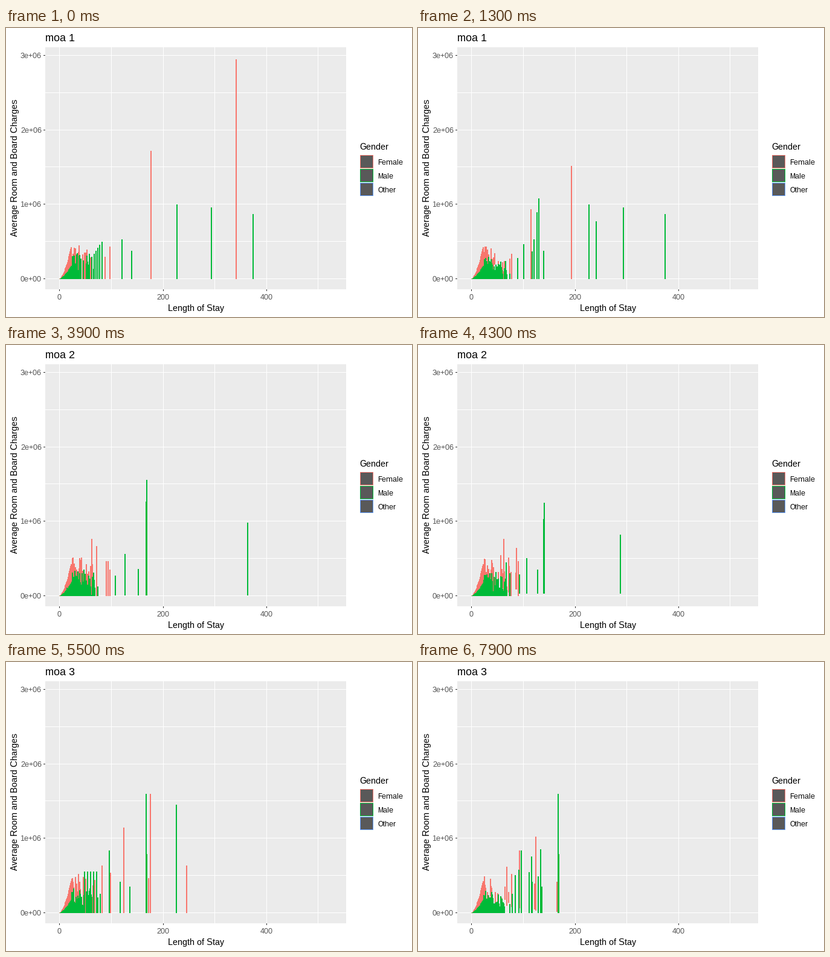
Animation of 672 by 480 pixels, one loop 8 s. Source, as a matplotlib script:

```python
import math
import numpy as np
import matplotlib.pyplot as plt
from matplotlib.animation import FuncAnimation
from matplotlib.collections import LineCollection
from matplotlib.patches import Rectangle

W, H, DPI = 672, 480, 100
RED, GREEN, BLUE = "#F8766D", "#00BA38", "#619CFF"
FRAMES, INTERVAL = 80, 100
CYCLE, STEPS, FIRST = 34, 17, 4      # frames per state, tween steps, first tween
BASE, UNIT = 417, 0.1236             # zero line, pixels per thousand

plt.rcParams.update({"font.family": "Liberation Sans",
                     "text.hinting": "native", "text.hinting_factor": 1})
fig = plt.figure(figsize=(W / DPI, H / DPI), dpi=DPI, facecolor="white")
ax = fig.add_axes([0, 0, 1, 1])
ax.set(xlim=(0, W), ylim=(H, 0))
ax.axis("off")


def box(x, y, w, h, color):
    ax.add_patch(Rectangle((x, y), w, h, fc=color, lw=0))


def label(x, y, text, px, color="black", **kw):
    return ax.text(x, y, text, size=px * 72 / DPI, color=color,
                   va=kw.pop("va", "baseline"), **kw)


def draw_panel():
    box(65, 32, 498, 402, "#EBEBEB")
    for i in range(6):
        x = int(88.8 + 85.6 * i)
        box(x, 32, 1, 402, "white")
        if i % 2 == 0:
            box(x, 434, 1, 3, "#333333")
            label(x, 451, str(100 * i), 12, "#4D4D4D", ha="center")
    for i in range(7):
        y = int(416.1 - 61.75 * i)
        box(65, y, 498, 1, "white")
        if i % 2 == 0:
            box(62, y, 3, 1, "#333333")
            label(59, y + 5, f"{i // 2}e+{'06' if i else '00'}", 12, "#4D4D4D", ha="right")
    label(314, 470, "Length of Stay", 14.7, ha="center")
    label(22.5, 232.5, "Average Room and Board Charges", 14.7, rotation=90,
          ha="right", va="center")


def draw_legend():
    label(585, 202, "Gender", 14.7)
    for i, (name, color) in enumerate(zip(("Female", "Male", "Other"), (RED, GREEN, BLUE))):
        y = 211 + 23 * i
        box(586, y, 22, 22, color)
        box(587, y + 1, 20, 20, "#595959")
        label(615, y + 16, name, 12)


# Short stays: tops rise with the days, then scatter and thin out.
days = np.arange(1, 76)
day_x = 88.4 + 0.8575 * days
rng = np.random.default_rng(8)


def crowd(square, linear, limit, spread, thinning):
    rise = np.minimum(square * days ** 2 + linear * days, limit)
    scatter = rng.uniform(*spread, days.size)
    present = rng.random(days.size) < np.clip(1.5 - days / thinning, 0.12, 1)
    return rise * np.where(days < 24, 1, scatter * present)


red_crowds = [crowd(0.65, 4, 430, (0.45, 1.3), 40) for _ in range(4)]
green_crowds = [crowd(0.2, 3, 230, (0.4, 1.6), 52) for _ in range(4)]

# Long stays per state: x, top in thousands
red_long = (
    [(381, 2950), (240, 1720), (172, 440), (164, 300)],
    [(177, 370), (174, 490), (154, 700)],
    [(299, 640), (239, 1600), (236, 470), (195, 1150), (173, 540), (159, 640)],
)
green_long = (
    [(409, 870), (340, 960), (283, 1000), (208, 380), (192, 530)],
    [(416, 1030), (239, 1640), (238, 1330), (225, 370), (201, 580), (185, 270)],
    [(282, 1460), (233, 790), (232, 1600), (205, 360), (189, 420), (171, 840), (156, 260)],
    [(269, 390), (251, 1040), (248, 530), (214, 620), (205, 440)],
)


def convoy(bars, near, x, dx, top, dtop=0, lift=0.0):
    """Bars on their way to a line of homes in the crowd; near is 0 far away, 1 at home."""
    for rank, (far_x, far_top) in enumerate(bars):
        home_x, home_top = x + dx * rank, top + dtop * rank
        yield (far_x + (home_x - far_x) * near, lift * home_top * near,
               far_top + (home_top - far_top) * near)


def still(bars):
    return [(x, 0, top) for x, top in bars]


def long_stays(state, p):
    """Leaving bars sink into the crowd, arriving ones grow out, unmatched ones wait."""
    away = 1 - p
    if state == 0:
        red = [*convoy(red_long[0], p, 141, 0, 250)]
        green = [*still(green_long[0]),
                 *convoy(green_long[1], away, 159, -3.3, 500, -40)]
    elif state == 1:
        red = [*convoy(red_long[1], p, 98, 0, 200),
               *convoy(red_long[2], away, 131, 0, 250, lift=0.5),
               *still([(166, 470), (142, 770)])]
        green = [*convoy(green_long[1], p, 140, -2.3, 330, lift=0.3),
                 *convoy(green_long[2][:2], away, 90, 29, 28, 83)]
    else:
        red = [*convoy(red_long[2], p, 133, -0.7, 100, 100, lift=0.4)]
        green = [*convoy(green_long[2][:1], p, 90, 0, 5),
                 *still(green_long[2][1:]),
                 *convoy(green_long[3], away, 150, -5, 560)]
    return red, green


def bars_at(state, p):
    red, green = long_stays(state, p)
    red_tops, green_tops = (rows[state] + (rows[state + 1] - rows[state]) * p
                            for rows in (red_crowds, green_crowds))
    lift = 1.2 * min(p, 1 - p)
    bottoms = np.where((days > 28) & (days % 4 < 2), red_tops * lift, 0)
    return [*zip(day_x, bottoms, red_tops), *red], [*zip(day_x, 0 * days, green_tops), *green]


def segments(bars):
    columns = ((math.floor(x + 0.25), b, top) for x, b, top in bars if top > 0)
    return [[(x, BASE - b * UNIT), (x, BASE - top * UNIT)] for x, b, top in columns]


def phase(frame):
    """State index and tween progress."""
    if frame < FIRST:
        return 0, 0.0
    state, step = divmod(frame - FIRST, CYCLE)
    return (state, step / STEPS) if step < STEPS else (state + 1, 0.0)


draw_panel()
draw_legend()
title = label(65, 22, "moa 1", 17.6)
layers = []
for order, color in ((3, RED), (4, GREEN)):
    layer = LineCollection([], colors=color, linewidths=2 * 72 / DPI,
                           capstyle="butt", antialiaseds=False, zorder=order)
    ax.add_collection(layer, autolim=False)
    layers.append(layer)


def update(frame):
    state, p = phase(frame)
    for layer, bars in zip(layers, bars_at(state, p)):
        layer.set_segments(segments(bars))
    title.set_text(f"moa {state + 1 + (p > 0.55)}")
    return [*layers, title]


anim = FuncAnimation(fig, update, frames=FRAMES, interval=INTERVAL,
                     repeat=True, repeat_delay=0, blit=False)
plt.show()
```
